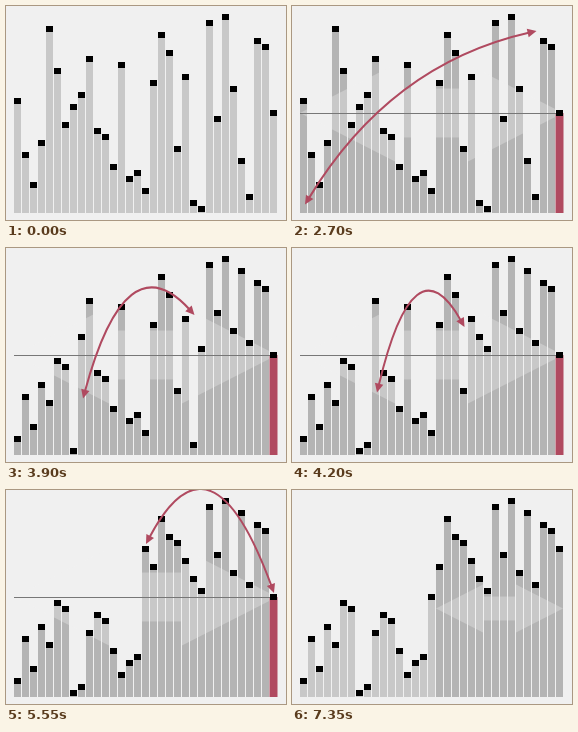
Animation, 280 px wide and 214 px high, one loop 8 s. Source, as an HTML page with a canvas:

```html
<!DOCTYPE html>
<html lang="en">
<head>
<meta charset="utf-8">
<title>Quicksort partition</title>
<style>
html, body { margin: 0; width: 100%; height: 100%; overflow: hidden; background: #f0f0f0; }
canvas { display: block; }
</style>
</head>
<body>
<canvas id="stage" width="280" height="214"></canvas>
<script>
const ctx = document.getElementById('stage').getContext('2d');
const LOOP = 8000;
const BACKGROUND = '#f0f0f0', IDLE = '#c8c8c8', ACTIVE = '#b4b4b4', PIVOT = '#b04a60';
const START = [19, 10, 5, 12, 31, 24, 15, 18, 20, 26, 14, 13, 8, 25, 6, 7, 4,
  22, 30, 27, 11, 23, 2, 1, 32, 16, 33, 21, 9, 3, 29, 28, 17];
const LAST = START.length - 1;

// Arrow on screen from `from` to `to`; the two bars trade places at `swapAt`.
const swaps = [
  { a: 0, b: 29, from: 2700, to: 3000, swapAt: 3000, bend: [98, 58] },
  { a: 4, b: 28, from: 3000, to: 3300, swapAt: 3300, bend: [108, 15] },
  { a: 5, b: 25, from: 3300, to: 3600, swapAt: 3600, bend: [113, -4] },
  { a: 7, b: 23, from: 3600, to: 3900, swapAt: 3900, bend: [118, -8] },
  { a: 8, b: 22, from: 3900, to: 4200, swapAt: 4200, bend: [120, -9] },
  { a: 9, b: 20, from: 4200, to: 4500, swapAt: 4500, bend: [122, -11] },
  { a: 13, b: 16, from: 4500, to: 4800, swapAt: 4500, bend: [121, 74] },
  { a: 16, b: LAST, from: 5550, to: 6150, swapAt: 6150, bend: [205, -70], tips: [[140, 54], [268, 103]] }
];

const barX = i => 8 + 8 * i;
const valueY = v => 209 - 6 * v;

function valuesAt(time) {
  const values = [...START];
  for (const { a, b, swapAt } of swaps) {
    if (time >= swapAt) [values[a], values[b]] = [values[b], values[a]];
  }
  return values;
}

function polygon(points, color) {
  ctx.fillStyle = color;
  ctx.beginPath();
  points.forEach(p => ctx.lineTo(...p));
  ctx.fill();
}

function rangeArrow(left, right, y, head, half) {
  const l = left + head, r = right - head, shaft = half / 2;
  polygon([
    [left, y], [l, y - half], [l, y - shaft], [r, y - shaft], [r, y - half],
    [right, y], [r, y + half], [r, y + shaft], [l, y + shaft], [l, y + half]
  ], 'rgba(240,240,240,.33)');
}

// Draws a head at `tip` and returns the point where the shaft meets it.
function arrowHead(tip, bend) {
  const angle = Math.atan2(tip[1] - bend[1], tip[0] - bend[0]);
  const dx = Math.cos(angle), dy = Math.sin(angle);
  const at = (back, side) => [tip[0] - back * dx - side * dy, tip[1] - back * dy + side * dx];
  polygon([tip, at(9, 4.3), at(9, -4.3)], PIVOT);
  return at(7, 0);
}

function swapArrow({ a, b, bend, tips }) {
  const slopeTip = x => [x, 207.6 - 0.75 * (x - 1)];
  const [left, right] = tips || [slopeTip(barX(a) + 5), slopeTip(barX(b) + 4.5)];
  const start = arrowHead(left, bend), end = arrowHead(right, bend);
  ctx.strokeStyle = PIVOT;
  ctx.lineWidth = 2;
  ctx.beginPath();
  ctx.moveTo(...start);
  ctx.quadraticCurveTo(...bend, ...end);
  ctx.stroke();
}

function draw(time) {
  const values = valuesAt(time);
  const firstActive = time < 1200 ? LAST + 1 : time < 7350 ? 0 : 17;
  const showPivot = time >= 1950 && time < 7350;
  const pivot = time < 6150 ? LAST : 16;

  ctx.fillStyle = BACKGROUND;
  ctx.fillRect(0, 0, 280, 214);
  values.forEach((v, i) => {
    ctx.fillStyle = i >= firstActive ? ACTIVE : IDLE;
    ctx.fillRect(barX(i), valueY(v), 7, 207 - valueY(v));
  });

  if (time >= 7350) rangeArrow(144, 271, 118.5, 47, 24);
  else if (time >= 1200) rangeArrow(8, 271, 107, 96, 49);

  if (showPivot) {
    ctx.fillStyle = PIVOT;
    ctx.fillRect(barX(pivot) - 0.5, 107, 8, 100);
    ctx.fillStyle = '#777';
    ctx.fillRect(8, 107, 263, 1);
  }

  ctx.fillStyle = '#000';
  values.forEach((v, i) => ctx.fillRect(barX(i), valueY(v) - 3, 7, 6));

  swaps.filter(s => time >= s.from && time < s.to).forEach(swapArrow);
}

const origin = performance.now();
function tick() {
  draw((performance.now() - origin) % LOOP);
  requestAnimationFrame(tick);
}
tick();
</script>
</body>
</html>
```
